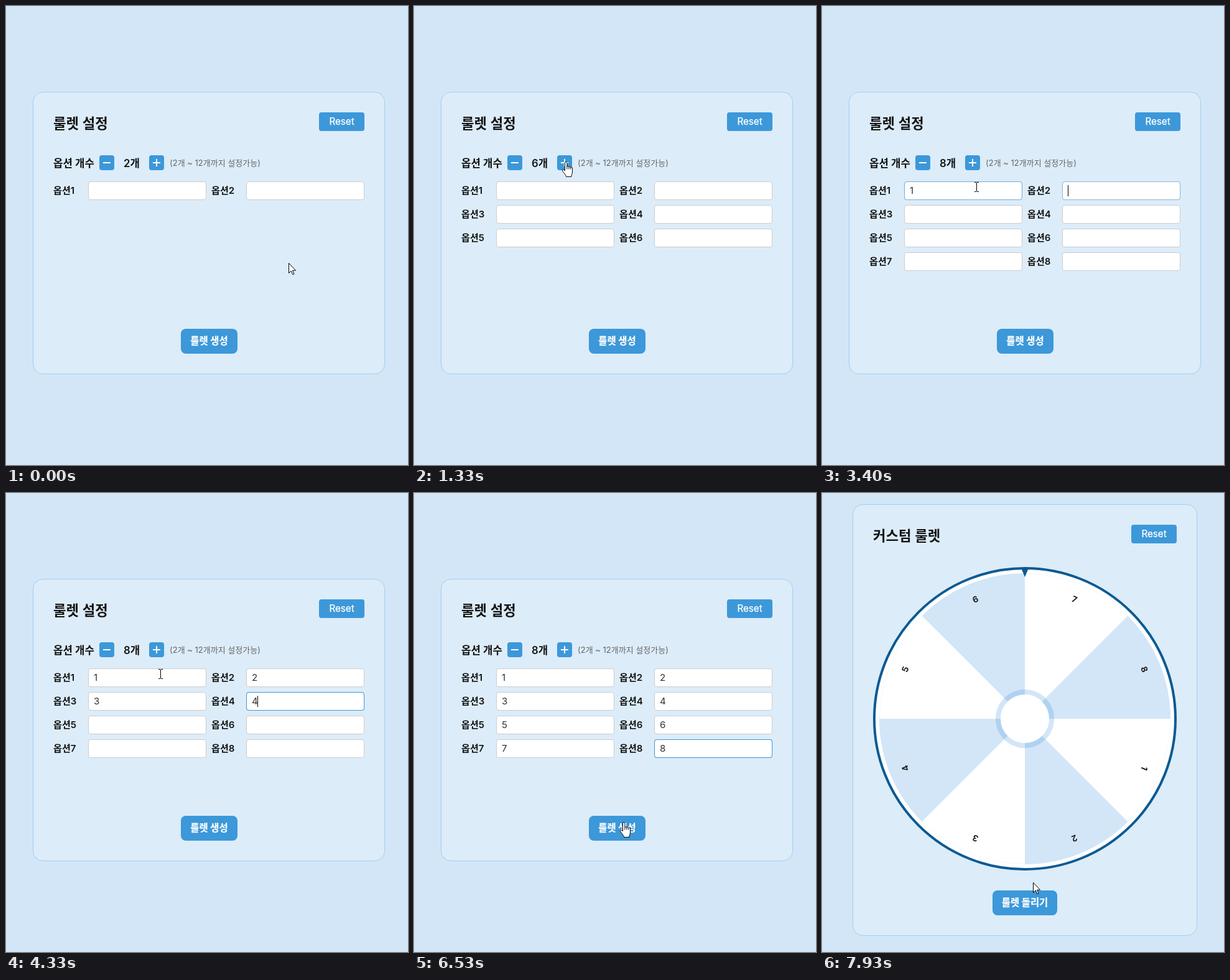
An HTML page for the animation above (8000 ms loop, 646 by 738 pixels).

```html
<!DOCTYPE html>
<html lang="ko">
<head>
<meta charset="utf-8">
<title>룰렛</title>
<style>
  html, body { margin: 0; width: 646px; height: 738px; overflow: hidden; background: #d3e6f7; }
  svg { display: block; }
  text { font: 600 15.1px Inter, 'Noto Sans CJK KR', 'Noto Sans CJK', sans-serif; fill: #141414; white-space: pre; }
  .title { font-size: 22.3px; }
  .count { font-size: 16.8px; }
  .hint { font-size: 13px; font-weight: 400; fill: #666; }
  .value { font-weight: 400; fill: #333; }
  .mid { font-size: 15.4px; font-weight: 700; text-anchor: middle; fill: #fff; stroke: #fff; stroke-width: .25px; }
  .reset { font-size: 15.2px; font-weight: 400; }
  .slot { font-size: 13.8px; font-weight: 700; text-anchor: middle; fill: #222; }
</style>
</head>
<body>
<svg id="stage" width="646" height="738"></svg>
<script>
const LOOP = 8000, FPS = 15, FIELDS = 8, CREATE = 6660;
const BLUE = '#3c98d9', NAVY = '#0b5a92', PALE = '#d3e6f7';
const stage = document.getElementById('stage');

// Steady clicks that slow down at the end, then steady tabbing and typing
const addAt = k => 730 + 200 * k + 67 * Math.max(0, k - 3) ** 2;
const focusAt = i => 3000 + 365 * i;
const typeAt = i => focusAt(i) + 200;

// Pointer moves; a bulge bends the way into an arc
const home = { x: 454, y: 413 };
const moves = [
  { from: 0, to: 267, x: 235, y: 243 },
  { from: 400, to: 600, x: 243, y: 250 },
  { from: 2200, to: 2533, x: 228, y: 291 },
  { from: 2600, to: 2733, x: 226, y: 286 },
  { from: 2733, to: 3000, x: 248, y: 291, bulge: [0, 105] },
  { from: 5800, to: 6533, x: 336, y: 529 },
  { from: 6933, to: 7800, x: 345, y: 588, bulge: [280, -383] },
  { from: 7800, to: 7933, x: 339, y: 626 }
];

const rect = (x, y, w, h, r, attrs) =>
  `<rect x="${x}" y="${y}" width="${w}" height="${h}" rx="${r}" ${attrs}/>`;
const text = (x, y, cls, s) => `<text x="${x}" y="${y}" class="${cls}">${s}</text>`;
const fill = c => `fill="${c}"`;
const circle = (r, attrs) => `<circle r="${r}" ${attrs}/>`;
const clamp = v => Math.max(0, Math.min(1, v));

const card = (x, y, w, h, title) =>
  rect(x + .5, y + .5, w - 1, h - 1, 16, 'fill="#dcecf9" stroke="#a0cdf0"') +
  text(x + 33, y + 58.5, 'title', title) +
  rect(x + w - 106, y + 33, 73, 30, 4, fill(BLUE)) +
  text(x + w - 69.5, y + 53.3, 'mid reset', 'Reset');

const button = (x, y, w, label) =>
  rect(x, y, w, 40, 8, fill(BLUE)) + text(x + w / 2, y + 25, 'mid', label);

const fieldPos = i => [132 + i % 2 * 254, 282 + (i >> 1) * 38];

function field(i, t) {
  const [x, y] = fieldPos(i);
  const leaveAt = i < FIELDS - 1 ? focusAt(i + 1) : Infinity;
  const fade = start => t < start ? 0 : clamp((t - start + 50) / 200);
  const glow = fade(focusAt(i)) - fade(leaveAt);
  const typed = t >= typeAt(i);
  const caret = t >= focusAt(i) && t < leaveAt && t < typeAt(i) + 500;
  return text(x - 56, y + 20, '', '옵션' + (i + 1)) +
    rect(x + .5, y + .5, 189, 29, 3.5, 'fill="#fff" stroke="#ccc"') +
    rect(x + .5, y + .5, 189, 29, 3.5, `fill="none" stroke="${BLUE}" opacity="${glow}"`) +
    (typed ? text(x + 9, y + 20, 'value', i + 1) : '') +
    (caret ? rect(x + (typed ? 18 : 9), y + 6, 1, 18, 0, fill('#000')) : '');
}

function countAt(t) {
  let n = 2;
  while (n < FIELDS && t >= addAt(n - 2)) n++;
  return n;
}

function form(t) {
  const n = countAt(t);
  let s = card(43, 138, 566, 454, '룰렛 설정') +
    text(76, 258.5, 'count', '옵션 개수') +
    rect(150, 240, 24, 24, 4, fill(BLUE)) + rect(156, 251, 12, 2, 0, fill('#fff')) +
    text(189, 258.5, 'count', n + '개') +
    rect(230, 240, 24, 24, 4, fill(BLUE)) + rect(236, 251, 12, 2, 0, fill('#fff')) +
    rect(241, 246, 2, 12, 0, fill('#fff')) +
    text(263, 257, 'hint', '(2개 ~ 12개까지 설정가능)');
  for (let i = 0; i < n; i++) s += field(i, t);
  return s + button(281, 519, 91, '룰렛 생성');
}

function wheel() {
  const d = 234 * Math.SQRT1_2;
  let s = circle(242, `fill="#fff" stroke="${NAVY}" stroke-width="4"`) +
    circle(233.5, 'fill="none" stroke="#f3f8fd"');
  for (let i = 0; i < 8; i++) {
    const a = i * 45;
    if (i % 2) s += `<path transform="rotate(${a})" d="M0 0V-234A234 234 0 0 1 ${d} ${-d}Z" fill="${PALE}"/>`;
    s += `<g transform="rotate(${a + 22.5})">${text(0, -203, 'slot', (i + 6) % 8 + 1)}</g>`;
  }
  s += circle(43, 'fill="none" stroke="rgba(11,115,211,.18)" stroke-width="8"') +
    circle(39, fill('#fff')) +
    `<path d="M-5.5 -241H5.5L0 -228Z" fill="${NAVY}"/>`;
  return card(49, 18, 554, 694, '커스텀 룰렛') +
    `<g transform="translate(326 363)">${s}</g>` +
    button(274, 639, 104, '룰렛 돌리기');
}

const shapes = {
  arrow: '<path d="M.5 .5V16.5L4.2 13 6.8 18.8 9 17.8 6.5 12.2H11.5Z" fill="#fff" stroke="#000"/>',
  hand: '<path transform="translate(-6)" d="M5.5 14.5V2.2a1.7 1.7 0 0 1 3.4 0V8.8a1.5 1.5 0 0 1 3 .6 1.5 1.5 0 0 1 2.9 .7' +
    ' 1.4 1.4 0 0 1 2.7 1V17c0 3-1.6 4-1.6 7.4H7.5c0-2.6-4-5.8-6-9.6-.8-2 1.2-2.6 2.4-1.4Z' +
    'M8.9 8.8V12.5M11.9 9.4V12.5M14.8 10.1V12.5" fill="#fff" stroke="#000" stroke-linejoin="round"/>',
  beam: '<path d="M-3 -7.5H0M1 -7.5H4M-3 7.5H0M1 7.5H4M.5 -7V7" fill="none" stroke="#000"/>'
};

function pointer(t) {
  let { x, y } = home;
  for (const m of moves) {
    const f = clamp((t - m.from) / (m.to - m.from));
    const [bx, by] = m.bulge || [0, 0];
    x += (m.x - x) * f + bx * Math.sin(Math.PI * f);
    y += (m.y - y) * f + by * Math.sin(Math.PI * f ** .7);
    if (f < 1) break;
  }
  x = Math.round(x);
  y = Math.round(y);
  const over = (l, top, w, h) => x >= l && x < l + w && y >= top && y < top + h;
  let kind = 'arrow';
  if (t < CREATE + 50) {
    if (over(230, 240, 24, 24) || over(281, 519, 91, 40)) kind = 'hand';
    for (let i = 0; i < countAt(t); i++) if (over(...fieldPos(i), 190, 30)) kind = 'beam';
  }
  return `<g transform="translate(${x} ${y})">${shapes[kind]}</g>`;
}

let shown = -1;
function draw(now) {
  const step = Math.floor((now % LOOP + 5) * FPS / 1000) % (LOOP * FPS / 1000);
  if (step !== shown) {
    shown = step;
    const t = step * 1000 / FPS;
    stage.innerHTML = (t < CREATE ? form(t) : wheel()) + pointer(t);
  }
  requestAnimationFrame(draw);
}
draw(performance.now());
</script>
</body>
</html>
```
